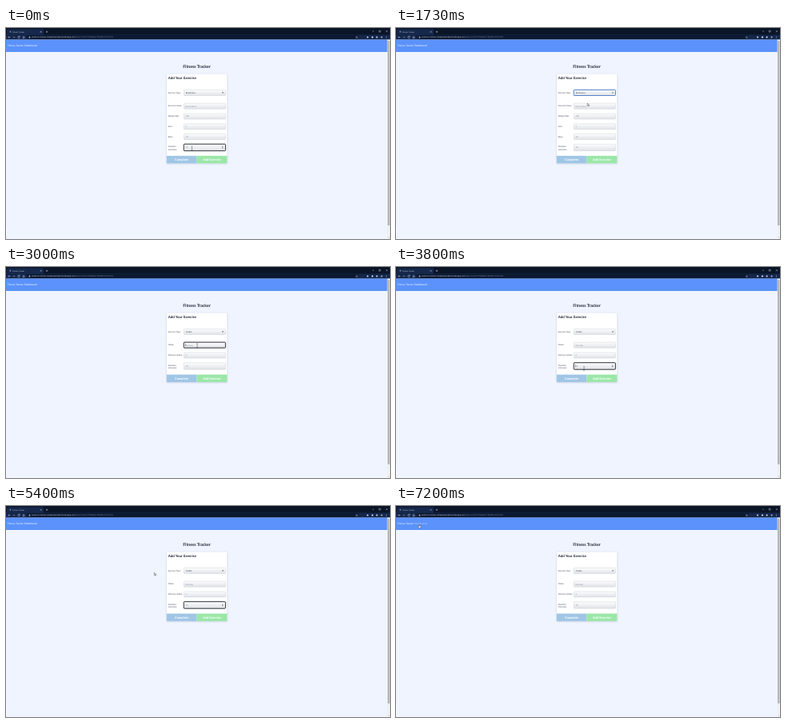
An HTML page for the animation above (8 s loop, 480x264 px).

```html
<!DOCTYPE html>
<html lang="en">
<head>
<meta charset="utf-8">
<title>Fitness Tracker</title>
<style>
html, body { margin: 0; width: 100%; height: 100%; overflow: hidden; background: #eff4ff; }
svg { display: block; width: 480px; height: 264px; font-family: Lato, sans-serif; text-rendering: geometricPrecision; }
.ui { font-family: "Open Sans", sans-serif; }
</style>
</head>
<body>
<svg id="stage" viewBox="0 0 480 264">
  <defs>
    <linearGradient id="field" x2="0" y2="1">
      <stop offset="0" stop-color="#fdfdfe"/>
      <stop offset="1" stop-color="#e0e2e6"/>
    </linearGradient>
    <filter id="soft" x="-10%" y="-10%" width="120%" height="120%">
      <feGaussianBlur stdDeviation="0.8"/>
    </filter>
  </defs>
</svg>
<script>
const LOOP = 8000, FPS = 15;
const stage = document.getElementById('stage');

function el(parent, tag, attrs, text) {
  const node = document.createElementNS('http://www.w3.org/2000/svg', tag);
  for (const k in attrs) node.setAttribute(k, attrs[k]);
  if (text) node.textContent = text;
  parent.append(node);
  return node;
}
const group = (parent, attrs) => el(parent, 'g', attrs);
const rect = (parent, x, y, width, height, fill, more) =>
  el(parent, 'rect', { x, y, width, height, fill, ...more });
const text = (parent, x, y, size, fill, str, more) =>
  el(parent, 'text', { x, y, 'font-size': size, fill, ...more }, str);
const line = (parent, d, stroke = '#c9d3e6', width = 0.5) =>
  el(parent, 'path', { d, stroke, fill: 'none', 'stroke-width': width });
const show = (node, on) => node.setAttribute('visibility', on ? 'visible' : 'hidden');

function browser() {
  const g = group(stage, { class: 'ui' });
  rect(g, 0, 0, 480, 9, '#0a1528');
  rect(g, 1, 1.2, 46, 9, '#16294c', { rx: 1.4 });
  rect(g, 0, 8.4, 480, 6.2, '#14264a');
  rect(g, 26, 9.1, 415, 4.8, '#0b1931', { rx: 2.4 });
  el(g, 'circle', { cx: 5.4, cy: 4.7, r: 0.9, fill: '#8497b8' });
  text(g, 8, 5.6, 2.2, '#d6deec', 'Fitness Tracker');
  line(g, 'M42.8 4l1.6 1.6M44.4 4l-1.6 1.6M49.8 4.8h2.4M51 3.6v2.4');
  line(g, 'M5.4 11.5h-2.6m1.1-1.1l-1.1 1.1l1.1 1.1');
  line(g, 'M8.4 11.5h2.6m-1.1-1.1l1.1 1.1l-1.1 1.1', '#8292ae');
  line(g, 'M17.1 10.7a1.3 1.3 0 1 0 .2 1.2M17.3 10v1h-1');
  line(g, 'M20.8 11.5l1.3-1.2l1.3 1.2M21.2 11.3v1.4h1.8v-1.4');
  rect(g, 28.7, 11.2, 1.6, 1.3, '#c9d3e6');
  line(g, 'M29 11.2v-.5a.5.5 0 0 1 1 0v.5', '#c9d3e6', 0.3);
  const url = text(g, 32, 12.4, 2.45, '#e2e8f3', 'workout-tracker-simpleexample.herokuapp.com');
  el(url, 'tspan', { fill: '#8393ae' }, '/exercise?id=5f7d0a8e17fb9200170c1b04');
  line(g, 'M458 4.2h2M466.2 3.2h1.9v1.9h-1.9zM475 3.2l2 2M477 3.2l-2 2', '#dfe6f2', 0.4);
  line(g, 'M438.4 10.3l.4 1h1l-.8.6l.3 1l-.9-.6l-.9.6l.3-1l-.8-.6h1z', '#c9d3e6', 0.3);
  [[452, '#c6d0e4'], [458, '#e8edf6'], [463.6, '#d4dceb'], [469.6, '#a9b7d0']].forEach(([cx, fill]) =>
    el(g, 'circle', { cx, cy: 11.5, r: 1.1, fill }));
  line(g, 'M475.4 10.2v.6M475.4 11.2v.6M475.4 12.2v.6', '#dfe6f2', 0.6);
}

function page() {
  rect(stage, 0, 14.6, 477, 15.4, '#5b92fb');
  text(stage, 2, 22.6, 3.05, '#fff', 'Fitness Tracker');
  const link = text(stage, 23, 22.6, 3.3, '#fff', 'Dashboard');
  rect(stage, 476.6, 14.6, 3.4, 249.4, '#f1f1f1');
  rect(stage, 477, 16, 2.6, 231, '#b5b7bb');
  line(stage, 'M477.6 261.6l.7.7l.7-.7', '#777', 0.4);
  rect(stage, 0, 248, 0.8, 12, '#fff');
  text(stage, 238.4, 50.2, 5.2, '#1c2330', 'Fitness Tracker',
    { 'font-weight': 700, 'text-anchor': 'middle' });
  return link;
}

const box = (parent, y, h) =>
  rect(parent, 222.4, y, 52, h, 'url(#field)', { rx: 0.8, stroke: '#c3c7ce', 'stroke-width': 0.4 });

// Each row: label lines, top of the field, field height, placeholder
function form(bottom, type, rows) {
  const g = group(stage);
  rect(g, 201, 58, 75.4, bottom - 57.6, '#8d9bb5', { filter: 'url(#soft)', opacity: 0.55 });
  rect(g, 200.8, 57.6, 75.6, bottom - 57.6, '#fff', { rx: 0.8 });
  text(g, 202.8, 64.2, 4.43, '#1c2330', 'Add Your Exercise', { 'font-weight': 700 });
  const label = (str, y) => text(g, 202.8, y, 2.52, '#3c4350', str);
  label('Exercise Type:', 82);
  box(g, 77.5, 7);
  text(g, 224.8, 81.9, 2.6, '#333a45', type);
  el(g, 'path', { d: 'M270 80.5h2l-1 1.3z', fill: '#222' });
  for (const [names, y, h, hint] of rows) {
    names.forEach((n, i) => label(n, y + 4.1 + i * 3.5 - (names.length - 1) * 0.3));
    box(g, y, h);
    text(g, 224.6, y + h / 2 + 0.8, 2.5, '#858b95', hint);
  }
  const button = (x, w, fill, str) => {
    rect(g, x, bottom - 9.4, w, 9.4, fill);
    text(g, x + w / 2, bottom - 3.4, 3.95, '#fff', str, { 'font-weight': 700, 'text-anchor': 'middle' });
  };
  button(200.8, 37.6, '#a0c6e6', 'Complete');
  button(238.4, 38, '#9be7a8', 'Add Exercise');
  return g;
}

function focusRing(y, h, color, spinner) {
  const g = group(stage);
  rect(g, 222.2, y, 52.2, h, 'none', { rx: 0.9, stroke: color, 'stroke-width': 0.9 });
  if (spinner) {
    const m = y + h / 2;
    el(g, 'path', { d: `M269.9 ${m - 0.4}h1.6l-.8-1.1zM269.9 ${m + 0.4}h1.6l-.8 1.1z`, fill: '#444' });
  }
  return g;
}

browser();
const link = page();
const duration = ['Duration', '(minutes):'];
const resistance = form(169.3, 'Resistance', [
  [['Exercise Name:'], 94.2, 7, 'Bench Press'],
  [['Weight (lbs):'], 107, 7, '200'],
  [['Sets:'], 119.8, 7, '4'],
  [['Reps:'], 132.5, 7, '10'],
  [duration, 145.3, 8.4, '30']
]);
const cardio = form(144, 'Cardio', [
  [['Name:'], 94.2, 7, 'Running'],
  [['Distance (miles):'], 107, 7, '3'],
  [duration, 119.8, 8.4, '30']
]);

// Visible spans in ms
const spans = [
  [resistance, 0, 2000],
  [cardio, 2000, LOOP],
  [focusRing(145.2, 8.5, '#22252b', true), 0, 1130],
  [focusRing(77.4, 7.1, '#4679c4'), 1130, 2600],
  [focusRing(94.1, 7.1, '#22252b'), 2600, 3530],
  [focusRing(119.7, 8.5, '#22252b', true), 3530, 5530],
  [rect(stage, 224.1, 96, 0.4, 3.2, '#333'), 2600, 3270],
  [rect(stage, 224.1, 122.2, 0.4, 3.2, '#333'), 3530, 4400]
];

const ink = { stroke: '#222', 'stroke-width': 0.4, 'stroke-linejoin': 'round' };
const pointers = {
  beam: ['M-.8-2.4h1.6M0-2.4v4.8M-.8 2.4h1.6', 'none'],
  arrow: ['M0 0v3.4l.8-.7l.6 1.3l.6-.3l-.6-1.2h1.1z', '#fff'],
  hand: ['M-.4.2a.4.4 0 0 1 .8 0v1.3l1.5.4q.4.2.3.7l-.3 1.5h-2l-1.2-1.6q.2-.6.9-.1z', '#fff']
};
const cursor = el(stage, 'path', ink);

// Pointer stops: time, x, y, shape from then on
const path = [
  [0, 232.4, 150.5, 'beam'], [200, 232.4, 150.5, 'beam'], [330, 233, 151, 'beam'],
  [470, 233, 151, 'beam'], [600, 238, 129, 'beam'], [730, 243, 91, 'arrow'], [800, 244, 86, 'arrow'],
  [930, 244, 86, 'arrow'], [1070, 245, 81, 'arrow'], [1200, 245, 81, 'arrow'],
  [1730, 239.2, 94, 'arrow'], [2400, 239.2, 94, 'arrow'],
  [2470, 239.2, 97.5, 'beam'], [2600, 239, 98.3, 'beam'], [3070, 239, 98.3, 'beam'],
  [3270, 237.2, 112, 'beam'], [3330, 237, 113, 'beam'], [3400, 237, 113, 'beam'],
  [3530, 236, 124, 'beam'], [3800, 235, 127, 'beam'], [4600, 235, 127, 'beam'],
  [4800, 226, 119, 'arrow'], [5130, 196, 93, 'arrow'], [5400, 185.3, 83.2, 'arrow'],
  [5660, 185.3, 83.2, 'arrow'], [5870, 130, 65, 'arrow'], [6130, 58, 41, 'arrow'],
  [6270, 43.5, 36.5, 'arrow'], [6530, 43.2, 36.2, 'arrow'], [6800, 18.4, 29.2, 'arrow'],
  [6930, 18.4, 29.2, 'arrow'], [7130, 26.5, 24, 'hand'], [7200, 28.8, 23.3, 'hand'], [LOOP, 28.8, 23.3, 'hand']
];

function draw(now) {
  const t = Math.floor((now % LOOP + 5) * FPS / 1000) * 1000 / FPS + 5;
  for (const [node, from, to] of spans) show(node, t >= from && t < to);
  let i = path.findIndex(p => p[0] > t);
  if (i < 0) i = path.length - 1;
  const [t0, x0, y0, shape] = path[i - 1], [t1, x1, y1] = path[i];
  const k = Math.min(1, (t - t0) / (t1 - t0));
  const [d, fill] = pointers[shape];
  cursor.setAttribute('d', d);
  cursor.setAttribute('fill', fill);
  cursor.setAttribute('transform', `translate(${x0 + (x1 - x0) * k} ${y0 + (y1 - y0) * k})`);
  link.setAttribute('fill', t >= 7130 ? '#b5cdfd' : '#fff');
}

const start = performance.now();
function tick() {
  draw(performance.now() - start);
  requestAnimationFrame(tick);
}
tick();
</script>
</body>
</html>
```
